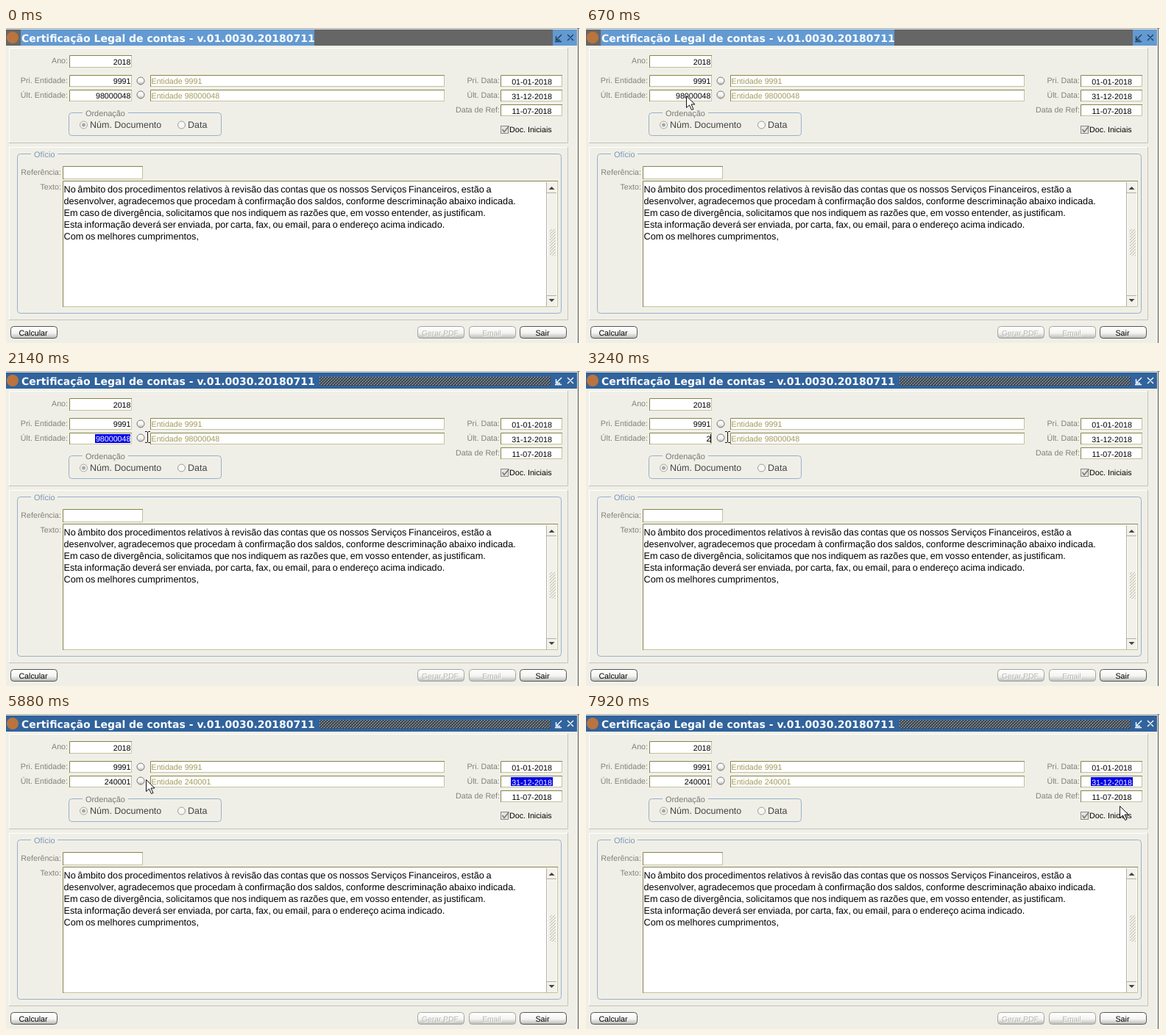
Recreate the animation shown at these times as an HTML page. Size 780x429 px, loop 8 s.

```html
<!DOCTYPE html>
<html lang="pt">
<head>
<meta charset="utf-8">
<title>Certificação Legal de contas</title>
<style>
  html, body { margin: 0; width: 100%; height: 100%; overflow: hidden; background: #f0efe7; }
  svg { display: block; font: 10.7px "Liberation Sans", Arial, sans-serif; text-rendering: geometricPrecision; white-space: pre; }
  rect, line { shape-rendering: crispEdges; }
  .round { shape-rendering: auto; }
  .letter { word-spacing: -.9px; }
</style>
</head>
<body>
<svg id="stage" width="780" height="429" viewBox="0 0 780 429">
  <defs>
    <pattern id="bumps" width="4" height="4" patternUnits="userSpaceOnUse" x="426" y="8">
      <rect width="4" height="4" fill="#4c5762"/>
      <path d="M0 0h1v1h-1zM2 2h1v1h-1z" fill="#c9c9c9" shape-rendering="crispEdges"/>
      <path d="M1 1h1v1h-1zM3 3h1v1h-1z" fill="#22272c" shape-rendering="crispEdges"/>
    </pattern>
    <pattern id="grip" width="4" height="4" patternUnits="userSpaceOnUse" x="739" y="274">
      <path d="M0 3l1.500-2M2 5l1.500-2M2 1l1.500-2" stroke="#b4b4aa"/>
    </pattern>
    <linearGradient id="silver" x2="0" y2="1">
      <stop offset="0" stop-color="#fff"/><stop offset=".55" stop-color="#f4f4f2"/><stop offset="1" stop-color="#b8b8b4"/>
    </linearGradient>
  </defs>
  <g id="form"></g>
  <g id="live"></g>
</svg>
<script>
const LOOP = 8000;
const form = document.getElementById('form');
const live = document.getElementById('live');

const rect = (x, y, w, h, fill, extra = '') =>
  `<rect x="${x}" y="${y}" width="${w}" height="${h}" fill="${fill}" ${extra}/>`;
const text = (x, y, s, fill = '#000', anchor = 'start', size = 10.7, extra = '') =>
  `<text x="${x}" y="${y}" fill="${fill}" text-anchor="${anchor}" font-size="${size}" ${extra}>${s}</text>`;
const stroke = (d, color, width = 1, fill = 'none') =>
  `<path d="${d}" stroke="${color}" stroke-width="${width}" fill="${fill}"/>`;
const label = (x, y, s) => text(x, y, s, '#80807a', 'end');
const disc = (x, y, r, fill, border) =>
  `<circle cx="${x}" cy="${y}" r="${r}" fill="${fill}" stroke="${border}"/>`;

function field(x, y, w, h) {
  return rect(x, y, w, h, '#fff') +
    stroke(`M${x + .5} ${y + h}V${y + .5}H${x + w}`, '#85854f') +
    stroke(`M${x + 1} ${y + h - .5}H${x + w - .5}V${y + 1}`, '#c2c2a0');
}

function panel(y, bottom) {
  return stroke(`M4.5 ${bottom}V${y + .5}H763`, '#fff') +
    stroke(`M4 ${bottom + .5}H763.5V${y}`, '#c3c3bc');
}

function group(x, y, w, h, title, titleX, titleWidth, color) {
  return rect(x + .5, y + .5, w, h, 'none', 'class="round" rx="4" stroke="#97b0cb"') +
    rect(titleX - 4, y - 3, titleWidth + 8, 7, '#f0efe7') +
    text(titleX, y + 5, title, color, 'start', 10.9);
}

function button(x, caption, enabled) {
  const edge = enabled ? '#555' : '#a5a5a0';
  return rect(x + .5, 406.5, 63, 16, 'url(#silver)', `class="round" rx="4" stroke="${edge}"`) +
    (enabled ? '' : text(x + 32, 420, caption, '#fff', 'middle', 10.3)) +
    text(x + 31, 419, caption, enabled ? '#000' : '#b5b5b0', 'middle', enabled ? 10.7 : 10.3);
}

function scrollbar() {
  return rect(735, 210, 13, 169, '#f3f2ea') +
    stroke('M734.5 210V379M735 224.5H748M735 364.5H748', '#b0b0a6') +
    stroke('M735.5 225V364', '#fff') +
    '<path d="M737.5 220h8l-4-4zM737.5 369h8l-4 4z" fill="#444"/>' +
    rect(739, 274, 8, 36, 'url(#grip)');
}

const letter = [
  'No âmbito dos procedimentos relativos à revisão das contas que os nossos Serviços Financeiros, estão a',
  'desenvolver, agradecemos que procedam à confirmação dos saldos, conforme descriminação abaixo indicada.',
  'Em caso de divergência, solicitamos que nos indiquem as razões que, em vosso entender, as justificam.',
  'Esta informação deverá ser enviada, por carta, fax, ou email, para o endereço acima indicado.',
  'Com os melhores cumprimentos,'
];

form.innerHTML =
  rect(0, 0, 780, 429, '#f0efe7') +
  stroke('M0 .5H780', '#aaa') + stroke('M777.5 0V429', '#555') +
  panel(27, 156) + panel(162, 397) +
  label(84, 48, 'Ano:') + field(86, 37, 85, 17) + text(169.5, 50, '2018', '#000', 'end') +
  label(84, 75, 'Pri. Entidade:') + field(86, 64, 85, 16) + text(169.5, 76, '9991', '#000', 'end') +
  label(84, 95, 'Últ. Entidade:') + field(86, 84, 85, 16) +
  [72, 91].map(y => disc(183, y, 5, 'url(#silver)', '#777')).join('') +
  field(196, 64, 400, 16) + field(196, 84, 400, 16) +
  text(197.5, 76, 'Entidade 9991', '#a29a5c') +
  ['Pri. Data:', 'Últ. Data:', 'Data de Ref:'].map((s, i) =>
    label(671, 75 + 20 * i, s) + field(672, 64 + 20 * i, 84, 16)).join('') +
  text(714.5, 77, '01-01-2018', '#000', 'middle') +
  text(714.5, 117, '11-07-2018', '#000', 'middle') +
  group(85, 115, 207, 31, 'Ordenação', 108, 54, '#777') +
  disc(105.5, 132, 5, '#f4f4f0', '#a5a5a0') + '<circle cx="105.5" cy="132" r="2.5" fill="#a8a8a3"/>' +
  disc(238.5, 132, 5, '#f7f7f3', '#999') +
  text(114, 136, 'Núm. Documento', '#444', 'start', 12.5) +
  text(247, 136, 'Data', '#444', 'start', 12.5) +
  rect(672.5, 133.5, 10, 10, '#e4e4df', 'stroke="#888"') +
  stroke('M674.5 138l2.5 3.5 6.5-8', '#777', 1.5) +
  text(684, 142, 'Doc. Iniciais') +
  group(15, 171, 739, 217, 'Ofício', 38, 28, '#7896bd') +
  label(75, 200, 'Referência:') + field(77, 188, 109, 18) +
  label(75, 220, 'Texto:') + field(77, 208, 673, 172) + scrollbar() +
  letter.map((s, i) => text(78.5, 224 + 16 * i, s, '#000', 'start', 12.7, 'class="letter"')).join('') +
  button(6, 'Calcular', true) + button(559, 'Gerar PDF', false) +
  button(629, 'Email', false) + button(698, 'Sair', true);

// Pointer moves: start, end, steps, from, to, shape
const moves = [
  [70, 370, 5, [740, 394], [235, 138], arrow],
  [445, 670, 4, [205, 122], [136, 92], arrow],
  [980, 980, 1, [137, 92], [137, 92], beam],
  [1530, 1610, 2, [131, 92], [124, 92], beam],
  [1910, 2140, 4, [141, 91], [192, 90], beam],
  [5880, 5880, 1, [190, 89], [190, 89], arrow],
  [7290, 7680, 6, [270, 83], [722, 88], arrow],
  [7850, 7920, 2, [724, 108], [725, 125], arrow]
];
const keyTimes = [3240, 3470, 3940, 4110, 4340, 4810];

function arrow(x, y) {
  return stroke(`M${x + .5} ${y + .5}v16l4-3.5 3 6.5 2.5-1-3-6.5h5z`, '#111', 1, '#fff');
}
function beam(x, y) {
  return stroke(`M${x - 3} ${y - 7.5}h2.5l1 1 1-1h2.5M${x + .5} ${y - 7}v14M${x - 3} ${y + 7.5}h2.5l1-1 1 1h2.5`, '#111');
}

function pointerAt(t) {
  const move = moves.filter(m => m[0] <= t).pop();
  if (!move) return null;
  const [start, end, steps, from, to, draw] = move;
  const p = steps < 2 ? 1 : Math.min(1, Math.floor((t - start) / (end - start) * (steps - 1) + 1e-6) / (steps - 1));
  const [x, y] = from.map((v, i) => Math.round(v + (to[i] - v) * p));
  return { x, y, draw };
}

function titleBar(active) {
  const background = active
    ? rect(0, 2, 776, 22, '#31639c') + rect(426, 8, 314, 12, 'url(#bumps)')
    : rect(0, 2, 776, 22, '#666') + rect(20, 2, 399, 22, '#639ad2') + rect(743, 2, 33, 22, '#639ad2');
  return background +
    '<circle cx="9" cy="13" r="8" fill="#b9743f"/>' +
    text(21, 18.5, 'Certificação Legal de contas - v.01.0030.20180711', '#fff', 'start', 14,
      'font-family="DejaVu Sans, sans-serif" font-weight="bold"') +
    stroke('M755 9l-7 7M747.5 11v5.500h5.500M746 18.500h9M763 9l8 8M771 9l-8 8', active ? '#fff' : '#1f3f60', 1.4);
}

function lastEntity(t, pointer) {
  const typed = keyTimes.filter(k => k <= t).length;
  const value = typed ? '240001'.slice(0, typed) : '98000048';
  const black = text(169.5, 96, value, '#000', 'end');
  if (t >= 1910 && t < 3240) {
    const count = Math.max(0, Math.min(8, Math.round((pointer.x - 121) / 6)));
    return black + rect(121, 86, count * 6, 12, '#0000e6') +
      text(121.9, 96, value.slice(0, count), '#fff');
  }
  const caret = t >= 3240 && t < 5350 ? 169 : t >= 900 && t < 1530 ? 133 : t >= 1530 && t < 1910 ? 121 : 0;
  return black + (caret ? rect(caret, 86, 1, 12, '#000') : '');
}

function render(t) {
  const pointer = pointerAt(t);
  const confirmed = t >= 5820;
  const overRadio = pointer && pointer.x >= 234 && pointer.x <= 274 && pointer.y >= 122 && pointer.y <= 142;
  live.innerHTML =
    titleBar(t >= 900) +
    lastEntity(t, pointer) +
    text(197.5, 96, 'Entidade ' + (confirmed ? '240001' : '98000048'), '#a29a5c') +
    (confirmed ? rect(686, 86, 57, 12, '#0000e6') : '') +
    text(714.5, 97, '31-12-2018', confirmed ? '#fff' : '#000', 'middle') +
    (overRadio ? stroke('M234 122.5h40M234 142.5h40', '#c4c4bd') : '') +
    (pointer ? pointer.draw(pointer.x, pointer.y) : '');
}

const begin = performance.now();
function tick() {
  render((performance.now() - begin) % LOOP);
  requestAnimationFrame(tick);
}
tick();
</script>
</body>
</html>
```
